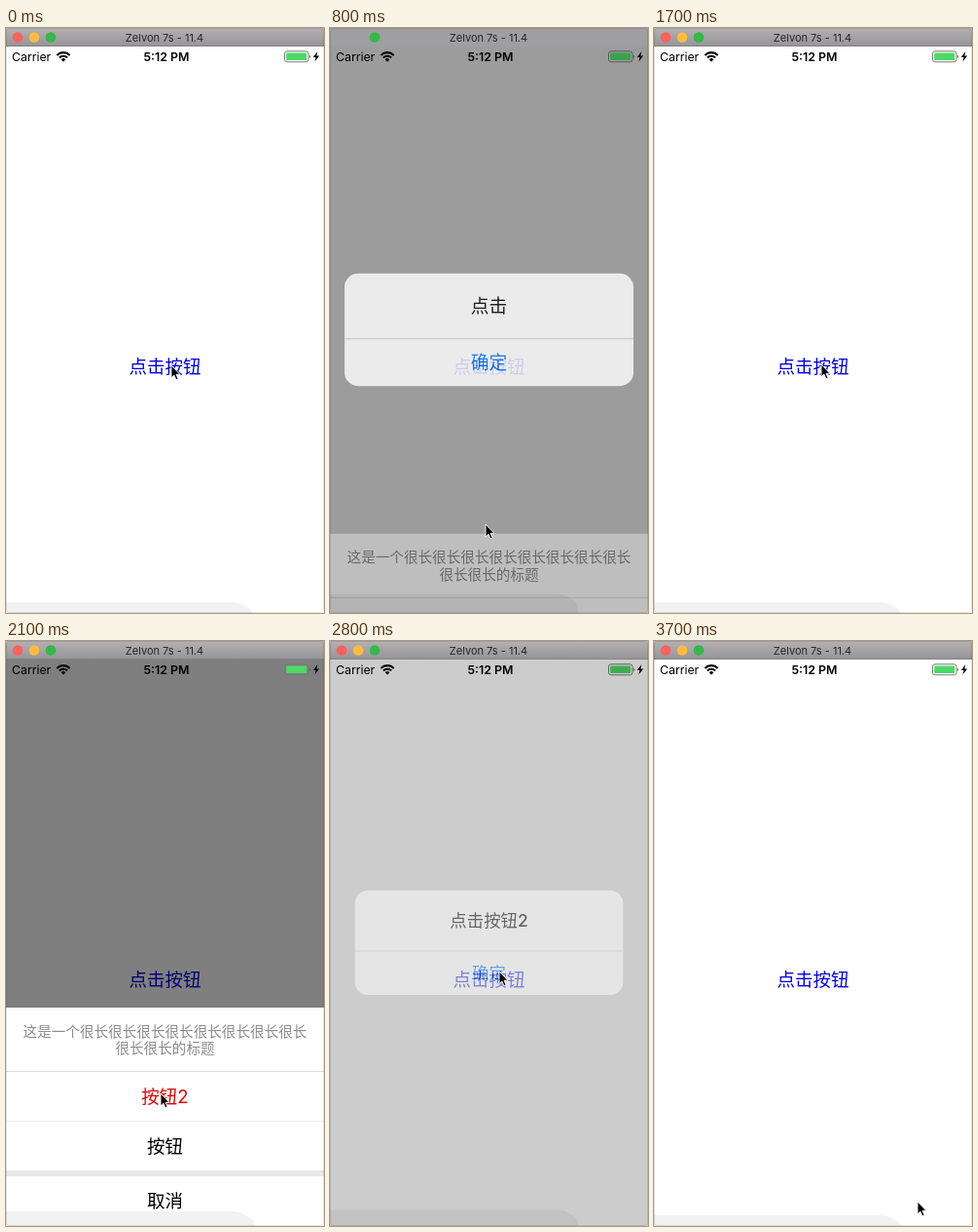
Write an HTML page that moves like this. It is 327 px wide and 600 px high and loops after 3800 ms.

```html
<!DOCTYPE html>
<html lang="zh-CN">
<head>
<meta charset="utf-8">
<title>Action sheet demo</title>
<style>
  html, body { margin: 0; width: 100%; height: 100%; overflow: hidden; background: #fff; }
  svg { display: block; width: 327px; height: 600px; }
  text { font-family: Inter, "Noto Sans CJK SC", "Noto Sans CJK", sans-serif; text-anchor: middle; }
  .row { font-size: 18.5px; }
  .note { font-size: 14.6px; fill: #8c8c8c; }
  .alert { font-size: 17.4px; font-weight: 500; }
</style>
</head>
<body>
<svg viewBox="0 0 327 600">
  <defs>
    <linearGradient id="metal" x2="0" y2="1">
      <stop offset="0" stop-color="#b3b1b3"/>
      <stop offset="1" stop-color="#969496"/>
    </linearGradient>
  </defs>

  <rect width="327" height="600" fill="#fff"/>
  <text class="row" x="163.5" y="353.7" fill="#0000e6">点击按钮</text>
  <rect id="sheetDim" y="19" width="327" height="581"/>

  <g id="sheet">
    <rect width="327" height="230" fill="#fff"/>
    <text class="note" x="163.5" y="29.6">这是一个很长很长很长很长很长很长很长很长</text>
    <text class="note" x="163.5" y="47.2">很长很长的标题</text>
    <path d="M0 65.5H327" stroke="#dcdcdc"/>
    <text class="row" x="163.5" y="98.3" fill="#e00000">按钮2</text>
    <path d="M0 116.5H327" stroke="#f0f0f0"/>
    <text class="row" x="163.5" y="149">按钮</text>
    <rect y="167" width="327" height="6" fill="#e8e8e8"/>
    <text class="row" x="163.5" y="205.3">取消</text>
  </g>

  <g id="status">
    <text x="6" y="33.7" font-size="12.3" style="text-anchor:start">Carrier</text>
    <g fill="none" stroke="#000" stroke-width="2.1">
      <path d="M52.4 27.9A9.3 9.3 0 0 1 65.6 27.9"/>
      <path d="M54.9 30.4A5.8 5.8 0 0 1 63.1 30.4"/>
    </g>
    <path d="M59 34.8L56.7 32.3A3.2 3.2 0 0 1 61.3 32.3Z"/>
    <text x="165" y="33.7" font-size="12.4" font-weight="600">5:12 PM</text>
    <rect x="286.5" y="23.8" width="24.5" height="11" rx="2.5" fill="none" stroke="#777"/>
    <rect x="288.2" y="25.5" width="21" height="7.6" rx="1.2" fill="#4cd964"/>
    <path d="M312.2 27.5Q314.2 29.3 312.2 31.1Z" fill="#555"/>
    <path d="M320.4 24L315.8 30H318.6L317.4 34.6L322.2 28.4H319.3Z"/>
  </g>

  <rect id="alertDim" y="19" width="327" height="581"/>
  <g id="alert">
    <rect x="25.7" y="256" width="275.6" height="107" rx="13" fill="#fff"/>
    <text id="message" class="alert" x="163.5" y="293.3"></text>
    <path d="M25.7 318H301.3" stroke="#d6d6d8"/>
    <text class="alert" x="163.5" y="346.9" fill="#007aff">确定</text>
  </g>

  <g id="bar">
    <rect id="barFill" width="327" height="19" fill="url(#metal)"/>
    <path id="barEdge" d="M0 18.5H327" stroke="#858385"/>
    <g id="lights">
      <circle cx="12" cy="9.5" r="5.3" fill="#fc615d"/>
      <circle cx="29" cy="9.5" r="5.3" fill="#fdbc40"/>
    </g>
    <circle cx="46" cy="9.5" r="5.3" fill="#34b84a"/>
    <text x="163" y="13.5" font-size="11" fill="#262626">Zelvon 7s - 11.4</text>
  </g>

  <path id="shade" d="M0 0H234Q247 1 255 11V40H0Z" fill-opacity=".05"/>
  <rect x=".5" y=".5" width="326" height="599" rx="3" fill="none" stroke="#000" stroke-opacity=".1"/>
  <path id="cursor" d="M0 0V12.8L2.9 10.1L4.9 14.8L7 13.9L5 9.3H8.9Z" stroke="#fff" stroke-width=".9"/>
</svg>
<script>
  const LOOP = 3800, STEP = 100, MOVE = 300;
  const $ = id => document.getElementById(id);
  const set = (id, attrs) => {
    for (const k in attrs) $(id).setAttribute(k, attrs[k]);
  };
  const ramp = (t, start) => Math.min(1, Math.max(0, (t - start) / MOVE));
  const easeOut = u => 1 - (1 - u) ** 2.5;
  const smooth = u => u * u * (3 - 2 * u);

  // open and close times
  const sheets = [[50, 700], [1790, 2200], [2890, 3280]];
  const alerts = [[700, 1350, '点击'], [2200, 2650, '点击按钮2']];

  // time, x, y of the pointer tip
  const trail = [
    [0, 170, 346], [200, 170, 346], [600, 160, 509], [900, 160, 509],
    [1300, 186, 327], [1450, 186, 327], [1700, 172, 345], [1800, 172, 345],
    [2050, 159, 464], [2200, 159, 464], [2500, 174, 327], [2700, 174, 327],
    [2850, 174, 343], [3100, 174, 343], [3400, 271, 575], [3800, 271, 575]
  ];

  function pointer(t) {
    const i = trail.findIndex(k => k[0] > t);
    const [t0, x0, y0] = trail[i - 1], [t1, x1, y1] = trail[i];
    const u = smooth((t - t0) / (t1 - t0));
    return [x0 + (x1 - x0) * u, y0 + (y1 - y0) * u];
  }

  function draw(t) {
    const shown = sheets.reduce((sum, [open, close]) =>
      sum + easeOut(ramp(t, open)) - easeOut(ramp(t, close)), 0);
    set('sheet', { transform: `translate(0 ${600 - 224 * shown})` });
    set('sheetDim', { 'fill-opacity': 0.5 * shown });

    const [open, close, message] = alerts[t < 2000 ? 0 : 1];
    const grow = easeOut(ramp(t, open));
    const stay = 1 - smooth(ramp(t, close));
    const scale = 1.215 - 0.215 * grow;
    $('message').textContent = message;
    set('alert', {
      opacity: Math.min(1, 1.26 * grow) * stay,
      transform: `translate(163.5 309.5) scale(${scale}) translate(-163.5 -309.5)`
    });
    set('alertDim', { 'fill-opacity': 0.4 * grow * stay });

    const flat = t >= 700 && t < 1300;
    set('barFill', { fill: flat ? '#9f9fa1' : 'url(#metal)' });
    set('barEdge', { opacity: flat ? 0 : 1 });
    set('lights', { opacity: flat ? 0 : 1 });

    set('shade', { transform: `translate(0 ${589 - 4 * shown - 11 * grow * stay})` });
    set('cursor', { transform: `translate(${pointer(t)})` });
  }

  const start = performance.now();
  function tick() {
    const t = (performance.now() - start) % LOOP;
    draw(Math.floor(t / STEP) * STEP);
    requestAnimationFrame(tick);
  }
  tick();
</script>
</body>
</html>
```
